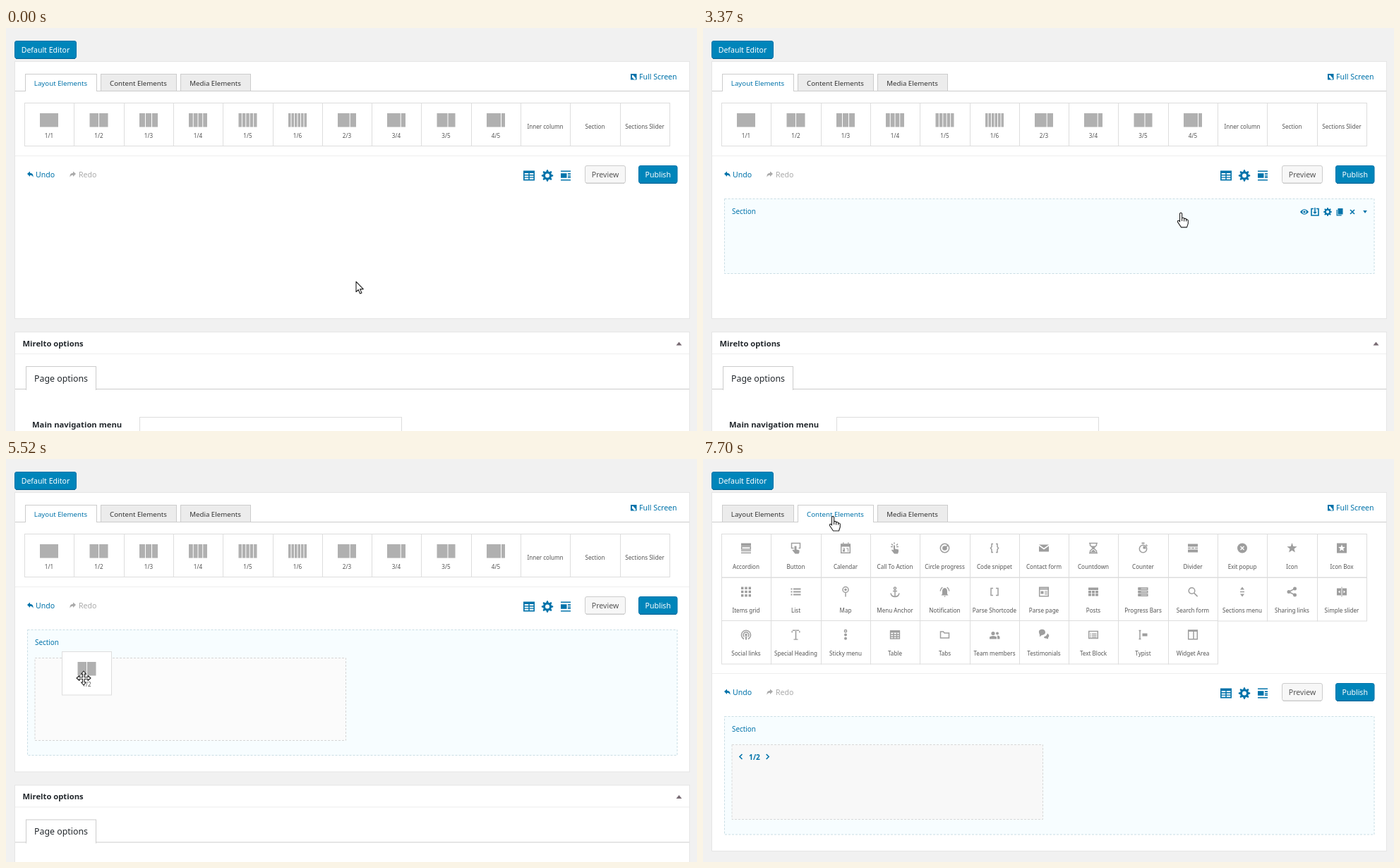
These frames come from a looping animation (979x572 px, 8000 ms). An HTML page:

```html
<!DOCTYPE html>
<html lang="en">
<head>
<meta charset="utf-8">
<title>Page builder</title>
<style>
html, body { margin: 0; width: 100%; height: 100%; overflow: hidden; background: #f1f1f1; }
svg { display: block; width: 979px; height: 572px; font-family: "Noto Sans", "Open Sans", sans-serif; }
.mid { text-anchor: middle; }
.link { fill: #0073aa; font-size: 10.55px; }
.cell { font-size: 8.1px; fill: #555; text-anchor: middle; }
.tab { font-size: 9.7px; text-anchor: middle; }
.head { font-size: 11.25px; font-weight: 600; fill: #23282d; }
.tip { font-size: 10.2px; font-weight: 600; font-style: italic; fill: #fff; text-anchor: middle; }
.blue { fill: #0073aa; fill-rule: evenodd; }
.line { fill: none; stroke: #0073aa; stroke-width: 1.6; }
.gf { fill: #999; fill-rule: evenodd; }
.gs { fill: none; stroke: #999; stroke-width: 1.5; }
</style>
</head>
<body>
<svg id="stage" viewBox="0 0 979 572"></svg>
<script>
const LOOP = 8000;
const svg = document.getElementById('stage');
const $ = id => document.getElementById(id);

// Markup helpers
const rect = (x, y, w, h, fill, stroke = 'none', more = '') =>
  `<rect x="${x}" y="${y}" width="${w}" height="${h}" fill="${fill}" stroke="${stroke}" ${more}/>`;
const text = (x, y, s, cls, more = '') => `<text x="${x}" y="${y}" class="${cls}" ${more}>${s}</text>`;
const path = (d, cls, more = '') => `<path d="${d}" class="${cls}" ${more}/>`;
const at = (x, y, body, more = '') => `<g transform="translate(${x} ${y})" ${more}>${body}</g>`;
const box = (x, y, w, h) => `M${x} ${y}h${w}v${h}h${-w}z`;
const ring = (x, y, r) => `M${x - r} ${y}a${r} ${r} 0 1 0 ${2 * r} 0a${r} ${r} 0 1 0 ${-2 * r} 0z`;
const hline = (y, color) => rect(13, y, 955, 1, color);

function gear(r) {
  const pts = [];
  for (let i = 0; i < 32; i++) {
    const a = (i - .5) * Math.PI / 16, k = i % 4 < 2 ? r : r * .72;
    pts.push((k * Math.cos(a)).toFixed(2) + ' ' + (k * Math.sin(a)).toFixed(2));
  }
  return 'M' + pts.join('L') + 'z' + ring(0, 0, r * .36);
}

function star(r) {
  const pts = [];
  for (let i = 0; i < 10; i++) {
    const a = i * Math.PI / 5 - Math.PI / 2, k = i % 2 ? r * .42 : r;
    pts.push((k * Math.cos(a)).toFixed(2) + ' ' + (k * Math.sin(a)).toFixed(2));
  }
  return 'M' + pts.join('L') + 'z';
}

function grid(xs, ys, w, h) {
  return ys.map(y => xs.map(x => box(x, y, w, h)).join('')).join('');
}

// Element palette
const colX = i => Math.round(26 + 70.3 * i);
const rowY = r => Math.round(106 + 61.7 * r);

function bars(label, cx, y) {
  const [a, b] = label.split('/').map(Number);
  const parts = a === 1 ? Array(b).fill(1 / b) : [a / b, 1 - a / b];
  const room = 26 - (parts.length - 1);
  let x = cx - 13, d = '';
  for (const p of parts) {
    d += box(x.toFixed(2), y, (p * room).toFixed(2), 19.5);
    x += p * room + 1;
  }
  return d;
}

const layout = ['1/1', '1/2', '1/3', '1/4', '1/5', '1/6', '2/3', '3/4', '3/5', '4/5',
  'Inner column', 'Section', 'Sections Slider'];

function layoutCell(label, i) {
  const x = colX(i), w = colX(i + 1) - x, cx = w / 2;
  const frac = label.includes('/');
  const body = rect(.5, .5, w, 61, '#fff', '#ddd', `id="edge${i}"`) +
    (frac ? path(bars(label, cx, 15), '', `fill="#b0b0b0" id="bars${i}"`) : '') +
    text(cx, frac ? 49.5 : 36.5, label, 'cell');
  return at(x, 106, body, `id="cell${i}"`);
}

// label, filled path, stroked path
const content = [
  ['Accordion', box(-7, -7, 14, 4) + box(-7, 3, 14, 1.6) + box(-7, 6, 14, 1.4), box(-6.3, -2, 12.6, 3.4)],
  ['Button', 'M-2-3h3v5l4 1v3l-1 2h-5l-4-5 1-1 2 1z', 'M-3 0h-3v-7h12v7h-2'],
  ['Calendar', box(-7, -6, 14, 4) + box(-4, 0, 3, 1) + box(-2, 1, 1, 4) + box(-4, 2, 2, 3) + box(1, 0, 3, 1) + box(3, 1, 1, 4) + box(-4, -8, 1.5, 3) + box(3, -8, 1.5, 3), box(-6.3, -5.3, 12.6, 12)],
  ['Call To Action', 'M-2-4h2v5l5 1v3l-1 3h-5l-4-5 1-1 2 1z', 'M-1-8v2M-5-6l2 2M4-6l-2 2M-6-2h3M5-2h-3'],
  ['Circle progress', ring(0, 0, 3.3), ring(0, 0, 6.2) + 'M0 0l5-5'],
  ['Code snippet', '', 'M-2-6h-2v4l-1.5 2 1.5 2v4h2M2-6h2v4l1.5 2-1.5 2v4h-2'],
  ['Contact form', 'M-7-5h14l-7 5zM-7-3l7 5 7-5v8h-14z', ''],
  ['Countdown', 'M-3-3h6l-3 3zM-4 6l4-4 4 4z', 'M-6-7h12M-6 7h12M-4.5-7v3l4 4-4 4v3M4.5-7v3l-4 4 4 4v3'],
  ['Counter', box(-2, -8, 4, 2) + 'M0 1v-4a4 4 0 0 1 4 4z', ring(0, 1, 5.2) + 'M4-5l2 2'],
  ['Divider', box(-7, -6, 14, 4) + grid([-7, -2, 3], [-.7], 4, 1.5) + box(-7, 2, 14, 4), ''],
  ['Exit popup', ring(0, 0, 7) + 'M-3-2l1-1 2 2 2-2 1 1-2 2 2 2-1 1-2-2-2 2-1-1 2-2z', ''],
  ['Icon', star(7.5), ''],
  ['Icon Box', box(-7, -7, 14, 14) + star(5.2), ''],
  ['Items grid', grid([-7, -1.7, 3.6], [-7, -1.7, 3.6], 3.4, 3.4), ''],
  ['List', grid([-7], [-5, -1, 3], 2, 2) + grid([-3.5], [-5, -1, 3], 10.5, 2), ''],
  ['Map', ring(0, -3, 1.8), ring(0, -3, 4) + 'M0 1v6'],
  ['Menu Anchor', '', ring(0, -5, 1.6) + 'M0-3v10M-3-1h6M-6 2q1 5 6 5t6-5'],
  ['Notification', 'M-5 5l1.5-2v-4q0-4 3.5-4.5 3.5.5 3.5 4.5v4l1.5 2zM-1.5 6h3l-1.5 1.5z', 'M-6.3-1q0-3 3-5.500M6.3-1q0-3-3-5.500'],
  ['Parse Shortcode', '', 'M-2-5h-3v10h3M2-5h3v10h-3'],
  ['Parse page', box(-7, -5, 14, 2) + box(-4.5, -1, 4, 4) + grid([1], [-1, 1, 3], 4, 1), box(-6.3, -6.3, 12.6, 12.6)],
  ['Posts', box(-7, -6, 14, 3.5) + grid([-7, -2, 3], [-1.5, 2.7], 4, 3.4), ''],
  ['Progress Bars', grid([-7], [-6, -1.5, 3], 4, 3), grid([-6.3], [-5.6, -1.1, 3.4], 12.6, 2.4)],
  ['Search form', '', ring(-1.5, -1.5, 4.3) + 'M1.600 1.600l5 5'],
  ['Sections menu', 'M0-7l3 4h-6zM0 7l3-4h-6z' + box(-3, -.8, 6, 1.6), ''],
  ['Sharing links', ring(-4.5, 0, 2.5) + ring(4, -4.5, 2.5) + ring(4, 4.5, 2.5), 'M4-4.500l-8.500 4.500 8.500 4.500'],
  ['Simple slider', box(-7, -5, 6, 10) + 'M-5 0l2.500-2v4z' + box(1, -5, 6, 10) + 'M5 0l-2.500-2v4z' + box(-.5, -7, 1, 14), ''],
  ['Social links', ring(0, 0, 1.8) + box(-1, 2, 2, 5), 'M-3 6a6.500 6.500 0 1 1 6 0M-2.500 3a3.800 3.800 0 1 1 5 0'],
  ['Special Heading', box(-6, -7, 12, 1.6) + box(-6, -7, 1.4, 4) + box(4.6, -7, 1.4, 4) + box(-.8, -6, 1.6, 12) + box(-3, 6, 6, 1.3), ''],
  ['Sticky menu', ring(0, 0, 2) + ring(0, 5.3, 2), ring(0, -5.3, 1.6)],
  ['Table', box(-7, -6, 14, 3), box(-6.4, -5.4, 12.8, 11) + 'M-6-.2h12M-6 2.700h12M-2-3v9M2.500-3v9'],
  ['Tabs', '', 'M-6-4.500h4l1.500 2h6.500v7h-12z'],
  ['Team members', ring(-2, -2, 2.6) + 'M-7 6v-3q5-3 10 0v3z' + ring(4, -2, 2) + 'M4 1q3 0 3.500 2v3h-3.500z', ''],
  ['Testimonials', 'M-7-3a4.500 4 0 1 1 6 3l-3 1-2 2v-3zM0 3q4-1 5-5 4 3 1 6v2l-3-1q-3 0-3-2z', ''],
  ['Text Block', grid([-4.5], [-2, .3, 2.6], 1.5, 1.2) + grid([-2], [-2, .3, 2.6], 6.5, 1.2), box(-6.3, -5, 12.6, 10)],
  ['Typist', box(-1, -2, 7, 4), 'M-6-6h3M-6 6h3M-4.500-6v12'],
  ['Widget Area', box(-7, -7, 14, 2.5), box(-6.3, -6.3, 12.6, 12.6) + 'M1-6v12']
];

function contentCell([label, fill, stroke], i) {
  const c = i % 13, x = colX(c), w = colX(c + 1) - x;
  const icon = at(w / 2, 20.5, path(fill, 'gf') + path(stroke, 'gs'), 'opacity=".95"');
  return at(x, rowY(i / 13 | 0), rect(.5, .5, w, 61.5, '#fff', '#ddd') + icon + text(w / 2, 49.5, label, 'cell'));
}

function tab(id, x, w, label) {
  return rect(x + .5, 65.5, w, 24, '#fff', '#ccc', `id="${id}Box"`) +
    text(x + w / 2, 81.5, label, 'tab', `id="${id}Text"`);
}

function tools(id, xs, y) {
  const icons = [
    path('M-6 0Q0-7.500 6 0 0 7.500-6 0z' + ring(0, 0, 2.8), 'blue') + path(ring(0, 0, 1.6), 'blue'),
    path('M-2-4.500h-3v9.500h10v-9.500h-3', 'line') + path('M-.8-6h1.600v6h2l-2.800 3-2.800-3h2z', 'blue'),
    path(gear(6), 'blue'),
    path('M-2.500-5h7v8.500h-7zM-4.500-3h1.200v7.300h6v1.200h-7.200z', 'blue'),
    path('M-3-3l6 6M3-3l-6 6', 'line', 'stroke-width="2"'),
    path('M-2.800-2h5.600l-2.800 4z', 'blue')
  ];
  return `<g id="${id}">` + icons.map((s, i) => at(xs[i], y, s)).join('') + '</g>';
}

function tip(id, cx, w, label) {
  return `<g id="${id}">` + rect(cx - w / 2, 58, w, 33, '#333', 'none', 'rx="2.5"') +
    path(`M${cx - 8} 90.500h16l-8 7.500z`, '', 'fill="#333"') + text(cx, 79, label, 'tip') + '</g>';
}

const button = (x, w, y, label, main) =>
  rect(x + .5, y + .5, w - 1, 24.5, main ? '#0085ba' : '#f7f7f7', main ? '#0073aa' : '#ccc', 'rx="2.5"') +
  rect(x + 2, y + 25, w - 4, 1, main ? '#006799' : '#ccc') +
  text(x + w / 2, y + 16.7, label, 'link mid', `style="fill:${main ? '#fff' : '#555'}"`);

const dash = 'stroke-dasharray="3 2"';
const arrowLeft = 'M0 3.500l4-3.500v2.200q5 0 4.500 6.300-1-3.200-4.500-3.200v2.200z';

const toolbar = hline(181, '#eee') +
  at(30, 203.5, path(arrowLeft, 'blue')) + text(42, 212, 'Undo', 'link') +
  at(99, 203.5, path(arrowLeft, '', 'fill="#aaa" transform="scale(-1 1)"')) +
  text(103, 212, 'Redo', 'link', 'style="fill:#aaa"') +
  at(741, 209.5, path(box(-8, -7, 16, 14) + grid([-6.3, .8], [-3.6, -.1, 3.3], 5.6, 2), 'blue')) +
  at(767, 209.5, path(gear(8.3), 'blue')) +
  at(793, 209.5, path(box(-7, -7, 14, 1.6) + box(-7, -3.2, 8.5, 6.4) + grid([3], [-3.2, -.3, 2], 4, 1.6) + box(-7, 5.4, 14, 1.6), 'blue')) +
  button(820, 58, 195, 'Preview') + button(896, 55.5, 195, 'Publish', true);

const section = '<g id="section">' +
  rect(30.5, 242.5, 920.5, 106, '#f7fdff', '#c9dde4', dash + ' id="secBox"') +
  text(41, 263.7, 'Section', 'link', 'style="font-size:9.9px"') +
  tools('secTools', [852, 867, 885, 902, 920, 938], 261) +
  rect(41, 282.5, 440.5, 117, '#fbfbfb', '#d5d5d5', dash + ' id="slot"') +
  '<g id="column">' + rect(41, 282.5, 440.5, 106, '#f8f8f8', '#d8d8d8', dash) +
  path('M55.500 296l-3.500 3.500 3.500 3.500M89.700 296l3.500 3.500-3.500 3.500', 'line') +
  text(73, 303.7, '1/2', 'mid blue', 'font-size="10.2" font-weight="600"') +
  tools('colTools', [379, 397.5, 415, 432, 450, 468], 300.5) + '</g></g>';

const options = rect(12.5, 431.5, 956, 300, '#fff', '#e5e5e5') + hline(462, '#eee') +
  text(23.5, 451.5, 'Mirelto options', 'head') + path('M949.500 450.500h8l-4-5z', '', 'fill="#776a72"') +
  hline(512, '#ccc') + rect(28.5, 480.5, 99, 33, '#fff', '#ccc') + rect(29, 511.5, 98, 3, '#fff') +
  text(78, 501.5, 'Page options', 'mid', 'font-size="12.35" font-weight="500" fill="#23282d"') +
  text(37, 567, 'Main navigation menu', 'head') + rect(189.5, 552.5, 371, 30, '#fff', '#ddd');

const clone = rect(.5, .5, 70, 61.5, '#fff', '#ddd') +
  path(bars('1/2', 35.5, 15), '', 'fill="#b0b0b0"') + text(35.5, 49.5, '1/2', 'cell');

const hand = path('M-1.500 1.500Q0-.8 1.600 1.500V8Q3 6.600 4.600 8V9Q6.300 7.800 7.600 9.300V10.200Q9.500 9.400 10.300 11.200V15.500L8.500 21H.5L-4.500 13.500Q-5 11-3 11.300L-1.500 13ZM1.600 8v4M4.600 8.500v4M7.600 9.500v3', '');
const arrow = path('M0 0V14.500L3.300 11.500 5.600 17 8 16 5.600 10.600H10.300Z', '');
const cross = path('M0-10L3.500-6H1.300V-1.300H6V-3.500L10 0 6 3.500V1.300H1.300V6H3.500L0 10-3.500 6H-1.300V1.300H-6V3.500L-10 0-6-3.500V-1.300H-1.300V-6H-3.500Z', '');

svg.innerHTML = rect(0, 0, 979, 572, '#f1f1f1') +
  button(12, 88, 18, 'Default Editor', true) +
  rect(12.5, 47.5, 956, 365, '#fff', '#e5e5e5', 'id="panel"') +
  hline(89, '#ccc') +
  tab('layout', 27, 101, 'Layout Elements') + tab('content', 134, 107, 'Content Elements') +
  tab('media', 247, 99, 'Media Elements') + rect(0, 89, 101, 1.5, '#fff', 'none', 'id="gap"') +
  path('M885 65h8.500v8.500h-8.500zM887 67v3l3 3h2v-2l-3.500-4z', 'blue') + text(897, 73, 'Full Screen', 'link') +
  '<g id="low">' + toolbar + section + '</g><g id="opt">' + options + '</g>' +
  '<g id="layoutCells">' + layout.map(layoutCell).join('') + rect(0, 0, 70, 61.5, 'none', '#888', 'id="hover"') + '</g>' +
  '<g id="contentCells">' + content.map(contentCell).join('') + '</g>' +
  tip('tipInner', 764.5, 387, 'Add inner column. Note that this column is allowed inside a column only.') +
  tip('tipSection', 835, 93, 'Add a Section') + tip('tipHalf', 132, 114, 'Add a 1/2 column') +
  `<g id="clone">${clone}</g>` +
  '<g id="cursor" fill="#fff" stroke="#222" stroke-width="1.1" stroke-linejoin="round">' +
  `<g id="hand">${hand}</g><g id="arrow">${arrow}</g><g id="cross">${cross}</g></g>`;

// Motion
const route = [[0, 496, 360], [480, 496, 360], [1200, 774, 141], [1340, 832, 131], [2185, 832, 131],
  [2190, 833, 131], [3040, 833, 131], [3500, 640, 293], [4050, 117, 133], [4130, 115, 131],
  [4400, 115, 131], [4600, 127, 138], [4700, 127, 140], [5060, 107, 228], [5500, 110, 311],
  [6440, 110, 311], [6900, 140, 150], [7130, 186, 54], [7300, 184, 79], [7400, 184, 81], [LOOP, 184, 81]];

const clamp = v => Math.max(0, Math.min(1, v));
const ramp = (t, a, b) => clamp((t - a) / (b - a));
const smooth = k => k * k * (3 - 2 * k);

function pointer(t) {
  const i = Math.max(1, route.findIndex(p => p[0] > t));
  const [t0, x0, y0] = route[i - 1], [t1, x1, y1] = route[i];
  const k = smooth(ramp(t, t0, t1));
  return [x0 + (x1 - x0) * k, y0 + (y1 - y0) * k];
}

const show = (id, on) => $(id).setAttribute('display', on ? 'inline' : 'none');
const move = (id, x, y) => $(id).setAttribute('transform', `translate(${x} ${y})`);
const set = (id, name, v) => $(id).setAttribute(name, v);
const fade = (id, t, a, b) => set(id, 'opacity', .98 * ramp(t, a, a + 80) * (1 - ramp(t, b, b + 80)));

function render(t) {
  const [x, y] = pointer(t);
  const second = t >= 7630, dropped = t >= 5820, drag = t >= 4745 && !dropped;
  const slot = t >= 5320 && !dropped;
  const secH = dropped ? 167.5 : slot ? 178 : 106;
  const shift = second ? 123 : 0, grow = dropped ? 21 : slot ? 31.5 : 0;

  set('panel', 'height', 365 + shift + grow);
  move('low', 0, shift);
  move('opt', 0, shift + grow);
  show('layoutCells', !second);
  show('contentCells', second);
  for (const id of ['layout', 'content', 'media']) {
    const on = id === (second ? 'content' : 'layout');
    set(id + 'Box', 'fill', on ? '#fff' : '#ececec');
    set(id + 'Text', 'fill', on ? '#0073aa' : '#333');
  }
  set('gap', 'x', second ? 135 : 28);
  set('gap', 'width', second ? 106 : 100);

  // Section and its column
  const inSection = !drag && !second && y > 242 && y < 242 + secH;
  show('section', t >= 2655);
  set('secBox', 'height', secH);
  show('secTools', inSection);
  show('slot', slot);
  show('column', dropped);
  show('colTools', inSection && y > 282);

  // Palette hover, and the dip of the clicked cell
  const inCells = !drag && !second && y > 106 && y < 168;
  const hot = inCells ? Math.floor((x - 26) / 70.3) : -1;
  const dip = t > 2600 && t < 2980 ? 28 * Math.sin(Math.PI * ramp(t, 2585, 2980)) : 0;
  move('cell11', colX(11), 106 + dip);
  show('hover', hot >= 0 && hot < 13);
  if (hot >= 0) {
    set('hover', 'x', colX(hot) + .5);
    set('hover', 'y', 106.5 + (hot === 11 ? dip : 0));
    set('hover', 'width', colX(hot + 1) - colX(hot));
  }
  for (let i = 0; i < 10; i++) set('bars' + i, 'fill', i === hot ? '#8c8c8c' : '#b0b0b0');

  fade('tipInner', t, 1265, 1365);
  fade('tipSection', t, 1415, 3140);
  fade('tipHalf', t, 4040, 4700);

  show('clone', drag);
  move('clone', x - 31, y - 38);

  const inTab = y > 65 && y < 106 && x > 134 && x < 241;
  const point = !drag && (inCells || inSection || inTab);
  move('cursor', x, y);
  show('cross', drag);
  show('hand', point);
  show('arrow', !drag && !point);
}

function frame() {
  render(performance.now() % LOOP);
  requestAnimationFrame(frame);
}
frame();
</script>
</body>
</html>
```
